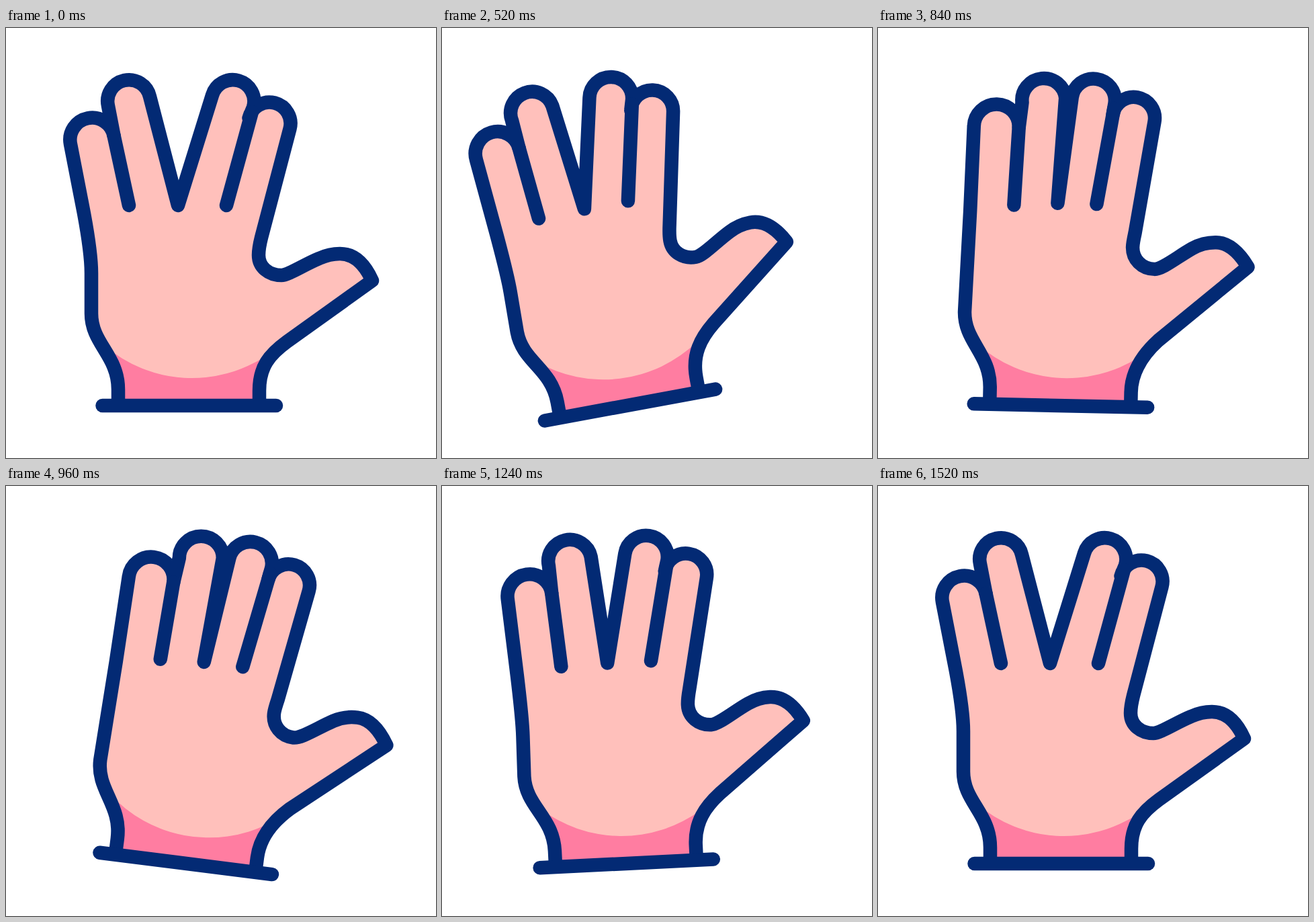
An HTML page that plays this animation: 640 by 640 pixels, repeating every 2 s.

```html
<!DOCTYPE html>
<html lang="en">
<head>
<meta charset="utf-8">
<title>Hand</title>
<style>
  html, body { margin: 0; width: 100%; height: 100%; overflow: hidden; background: #fff; }
  svg { display: block; width: 100%; height: 100%; }
  .line { fill: none; stroke: #032a74; stroke-width: 20.5; stroke-linecap: round; stroke-linejoin: round; }
</style>
</head>
<body>
<svg viewBox="0 0 640 640">
  <g id="hand">
    <path id="skin" fill="#ffc0bb"/>
    <path fill="#ff7da1" d="M147 473A200 200 0 0 0 388 487.4L377 530V558H167V525Z"/>
    <path id="outline" class="line"/>
    <path id="creases" class="line"/>
    <path class="line" d="M143.5 562H402"/>
  </g>
</svg>
<script>
const LOOP = 2000, STEP = 40;
const PIVOT = '271 522';

// Each shape: [fingers spread, fingers together].
// Fingertip radii are kept small so the arcs always grow to half circles.
const left = [
  `M167 558L167 538C167 487 127 470 127 425L127 365C127 340 121 303 116 276
   L96 173A30 30 0 0 1 160.5 160L152 116A30 30 0 0 1 214 102L256 264`,
  `M167 558L167 538C167 487 127 470 127 425L129 365C130 340 131 310 132 276
   L135 149A30 30 0 0 1 202 149L206 112A30 30 0 0 1 270.5 104L262 261`
];
const right = [
  `L307 100A30 30 0 0 1 368 118L361.5 134A30 30 0 0 1 422.5 150L380 312
   C376 328 376 332 376 338C376 356 391 368 410 368C420 368 444 352 466 343
   C477 338 486 336 497 336C520 336 535 354 545 376L418 467
   C392 486 377 504 377 540L377 558`,
  `L280 103A30 30 0 0 1 344 110.5L341.5 127A30 30 0 0 1 403.5 137L378 303
   C375 318 375 320 375 324C375 342 389 356 408 356C420 356 442 337 464 324
   C476 317 487 314.5 499 314.5C520 314.5 535 331 547 350L416 462
   C396 481 377 506 377 540L377 558`
];
const leftCrease = ['M160.5 160L183 264', 'M202 149L197 265'];
const rightCrease = ['M366 125L328 264', 'M343 118L320 261'];

// [time, value]
const turn = [[290, 0], [618, -13.3], [964, 7.2], [1285, -3.4], [1480, 0]];
const closeLeft = [[290, 0], [780, 1], [960, 1], [1520, 0]];
const closeRight = [[290, 0], [820, 1], [1000, 1], [1490, 0]];

const $ = id => document.getElementById(id);
const hand = $('hand'), skin = $('skin'), outline = $('outline'), creases = $('creases');

function valueAt(keys, t) {
  if (t <= keys[0][0]) return keys[0][1];
  for (let i = 1; i < keys.length; i++) {
    const [t0, a] = keys[i - 1], [t1, b] = keys[i];
    if (t < t1) {
      const u = (t - t0) / (t1 - t0);
      return a + (b - a) * u * u * (3 - 2 * u);
    }
  }
  return keys[keys.length - 1][1];
}

function morph([from, to], m) {
  const ends = to.match(/[\d.]+/g);
  let i = 0;
  return from.replace(/[\d.]+/g, n => +n + (ends[i++] - n) * m);
}

function draw(t) {
  const l = valueAt(closeLeft, t), r = valueAt(closeRight, t);
  const body = morph(left, l) + morph(right, r);
  skin.setAttribute('d', body);
  outline.setAttribute('d', body);
  creases.setAttribute('d', morph(leftCrease, l) + morph(rightCrease, r));
  hand.setAttribute('transform', `rotate(${valueAt(turn, t)} ${PIVOT})`);
}

const start = performance.now();
function tick() {
  const t = (performance.now() - start) % LOOP;
  draw(Math.floor(t / STEP) * STEP);
  requestAnimationFrame(tick);
}
tick();
</script>
</body>
</html>
```
